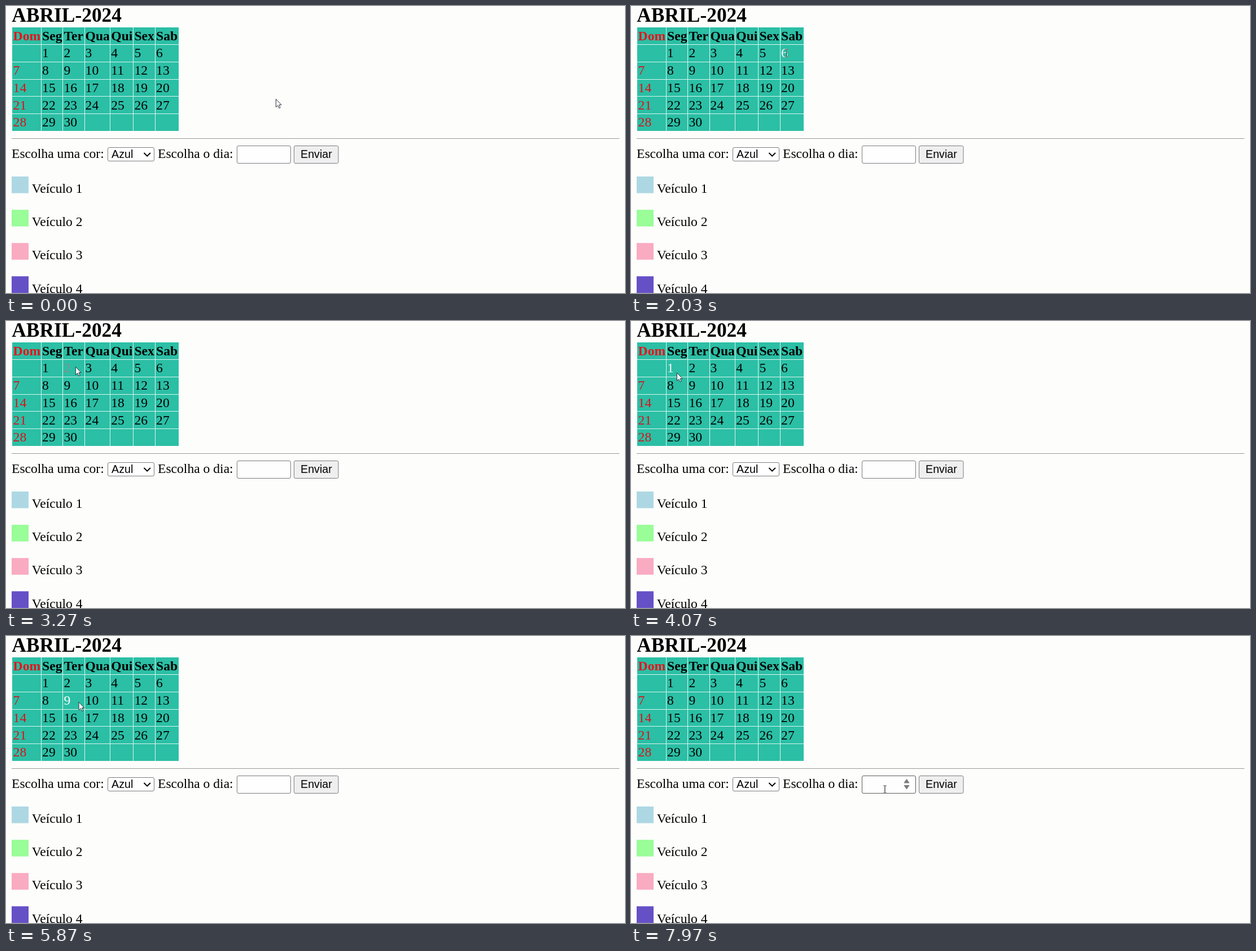
An HTML page for the animation above (8 s loop, 1097 px wide and 510 px high).

```html
<!DOCTYPE html>
<html lang="pt">
<head>
<meta charset="utf-8">
<title>Calendário</title>
<style>
html, body { margin: 0; width: 100%; height: 100%; overflow: hidden; background: #fdfdfc; }
svg { display: block; }
text { font: 23.6px "Liberation Serif", "Times New Roman", serif; }
.bold { font-weight: bold; }
.title { font-size: 35.4px; }
.ui { font: 19.7px "Liberation Sans", Arial, sans-serif; }
.box { stroke: #7c7c80; stroke-width: 1; }
#beam { mix-blend-mode: difference; }
</style>
</head>
<body>
<svg id="stage" width="1097" height="510" viewBox="0 0 1097 510"></svg>
<script>
const LOOP = 8000, FADE = 300, STEP = 10;
const TEAL = '#2bbfa5', RED = '#d9121a';
const ROW_TOP = 37.8, ROW_HEIGHT = 30.75;
const columns = [11, 62.5, 100.8, 139, 184.7, 225.8, 264.5, 306];
const weekdays = ['Dom', 'Seg', 'Ter', 'Qua', 'Qui', 'Sex', 'Sab'];
const inputBox = [409.5, 248.5, 95, 31];

// Pointer path: time, x, y
const path = [
  [0, 478, 165], [1230, 353.5, 110], [2030, 275.5, 83.5], [3270, 123, 81],
  [4000, 82, 90], [4870, 92.5, 114], [5870, 128.5, 117], [6600, 210, 141],
  [7300, 443, 267], [7970, 450, 272.5], [8000, 450, 272.5]
];

const stage = document.getElementById('stage');

function add(tag, attrs, content = '', parent = stage) {
  const node = document.createElementNS('http://www.w3.org/2000/svg', tag);
  for (const key in attrs) node.setAttribute(key, attrs[key]);
  node.textContent = content;
  parent.append(node);
  return node;
}
const label = (x, y, content, cls = '', fill = '#000') =>
  add('text', { x, y, class: cls, fill }, content);
const rect = (x, y, width, height, fill, extra = {}) =>
  add('rect', { x, y, width, height, fill, ...extra });

// Calendar
label(10.3, 28.2, 'ABRIL-2024', 'bold title');
rect(11, 38, 295, 184, TEAL);
const rules = columns.slice(1, 7).map(x => `M${Math.floor(x)}.5 38V222`);
for (let r = 1; r < 6; r++) rules.push(`M11 ${Math.floor(ROW_TOP + r * ROW_HEIGHT)}.5H306`);
add('path', { d: rules.join(''), stroke: '#dcf6f0', fill: 'none' });

const textX = col => columns[col] + 1.6;
const baseline = row => 60.6 + row * ROW_HEIGHT;
weekdays.forEach((name, col) =>
  label(textX(col), baseline(0), name, 'bold', col ? '#000' : '#e6131b'));
const days = [];
for (let day = 1; day <= 30; day++) {
  const col = day % 7, row = 1 + Math.floor(day / 7);
  days[day] = label(textX(col), baseline(row), day, '', col ? '#000' : RED);
}

// Form
rect(10, 235, 1077, 1, '#9a9a98');
label(10, 270, 'Escolha uma cor:');
rect(180.5, 251.5, 82, 24, '#fff', { class: 'box', rx: 2.5 });
label(187, 270, 'Azul', 'ui');
add('path', { d: 'M244.5 261l5.7 5.7 5.7-5.7', fill: 'none', stroke: '#000', 'stroke-width': 2 });
label(269, 270, 'Escolha o dia:');
const input = rect(...inputBox, '#fefefe', { class: 'box', rx: 2.5 });
const spinner = add('path', {
  d: 'M484 261l4.5-6.5 4.5 6.5zM484 265.5l4.5 6.5 4.5-6.5z',
  fill: '#7c7c7c', stroke: '#7c7c7c', 'stroke-width': 1, 'stroke-linejoin': 'round'
});
rect(510.5, 248.5, 78.5, 31, '#efefef', { class: 'box', rx: 2.5 });
label(522, 270, 'Enviar', 'ui');

['#add8e3', '#99fd98', '#f9abc1', '#6650c6'].forEach((color, i) => {
  rect(10, 303 + i * 59.1, 30, 29.6, color);
  label(45.8, 332.2 + i * 59.1, `Veículo ${i + 1}`);
});

// Pointers
const arrow = add('path', {
  d: 'M.5 .5V14.7L3.8 11.6 6 16.6 8.2 15.6 6 10.7H10.2Z',
  fill: '#fff', stroke: '#30303c', 'stroke-width': 1
});
const beam = add('path', {
  id: 'beam', d: 'M-2.5 -6.5H-.5M.5 -6.5H2.5M0 -6V6M-2.5 6.5H-.5M.5 6.5H2.5',
  fill: 'none', stroke: '#fff', 'stroke-width': 1
});

// Hermite curve through the path points
function pointerAt(t) {
  let i = 0;
  while (i < path.length - 2 && t >= path[i + 1][0]) i++;
  const a = path[i], b = path[i + 1], span = b[0] - a[0], u = (t - a[0]) / span;
  const slope = (k, axis) => {
    const p = path[Math.max(0, k - 1)], n = path[Math.min(path.length - 1, k + 1)];
    return (n[axis] - p[axis]) / (n[0] - p[0]) * span;
  };
  return [1, 2].map(axis => {
    const m0 = slope(i, axis), m1 = slope(i + 1, axis), d = b[axis] - a[axis];
    return a[axis] + u * (m0 + u * (3 * d - 2 * m0 - m1 + u * (m0 + m1 - 2 * d)));
  });
}

function dayAt([x, y]) {
  const col = columns.findIndex((left, c) => x >= left && x < columns[c + 1]);
  const row = Math.floor((y - ROW_TOP) / ROW_HEIGHT);
  const day = (row - 1) * 7 + col;
  return col >= 0 && row > 0 && day > 0 && day <= 30 ? day : 0;
}

const inside = ([x, y], [left, top, width, height]) =>
  x >= left && x <= left + width && y >= top && y <= top + height;

function render(t) {
  const point = pointerAt(t), hovered = dayAt(point), inInput = inside(point, inputBox);

  // The hovered day fades to white and snaps back when left
  let held = 0;
  while (hovered && held < FADE && t > held && dayAt(pointerAt(t - held)) === hovered) held += STEP;
  const u = Math.min(1, held / FADE), shade = Math.round(255 * u * u * (3 - 2 * u));
  days.forEach((node, day) => node.setAttribute('fill',
    day === hovered ? `rgb(${shade},${shade},${shade})` : day % 7 ? '#000' : RED));

  const overDay = hovered && point[0] < textX(hovered % 7) + (hovered > 9 ? 23.6 : 11.8);
  const overLabel = inside(point, [269, 250, 133, 27]);
  const textMode = inInput || overDay || overLabel;
  const move = `translate(${point[0].toFixed(1)} ${point[1].toFixed(1)})`;
  arrow.setAttribute('transform', move);
  beam.setAttribute('transform', move);
  arrow.style.display = textMode ? 'none' : '';
  beam.style.display = textMode ? '' : 'none';
  spinner.style.display = inInput ? '' : 'none';
  input.style.stroke = inInput ? '#5a5a5a' : '';
}

const start = performance.now();
function tick() {
  render((performance.now() - start) % LOOP);
  requestAnimationFrame(tick);
}
tick();
</script>
</body>
</html>
```
